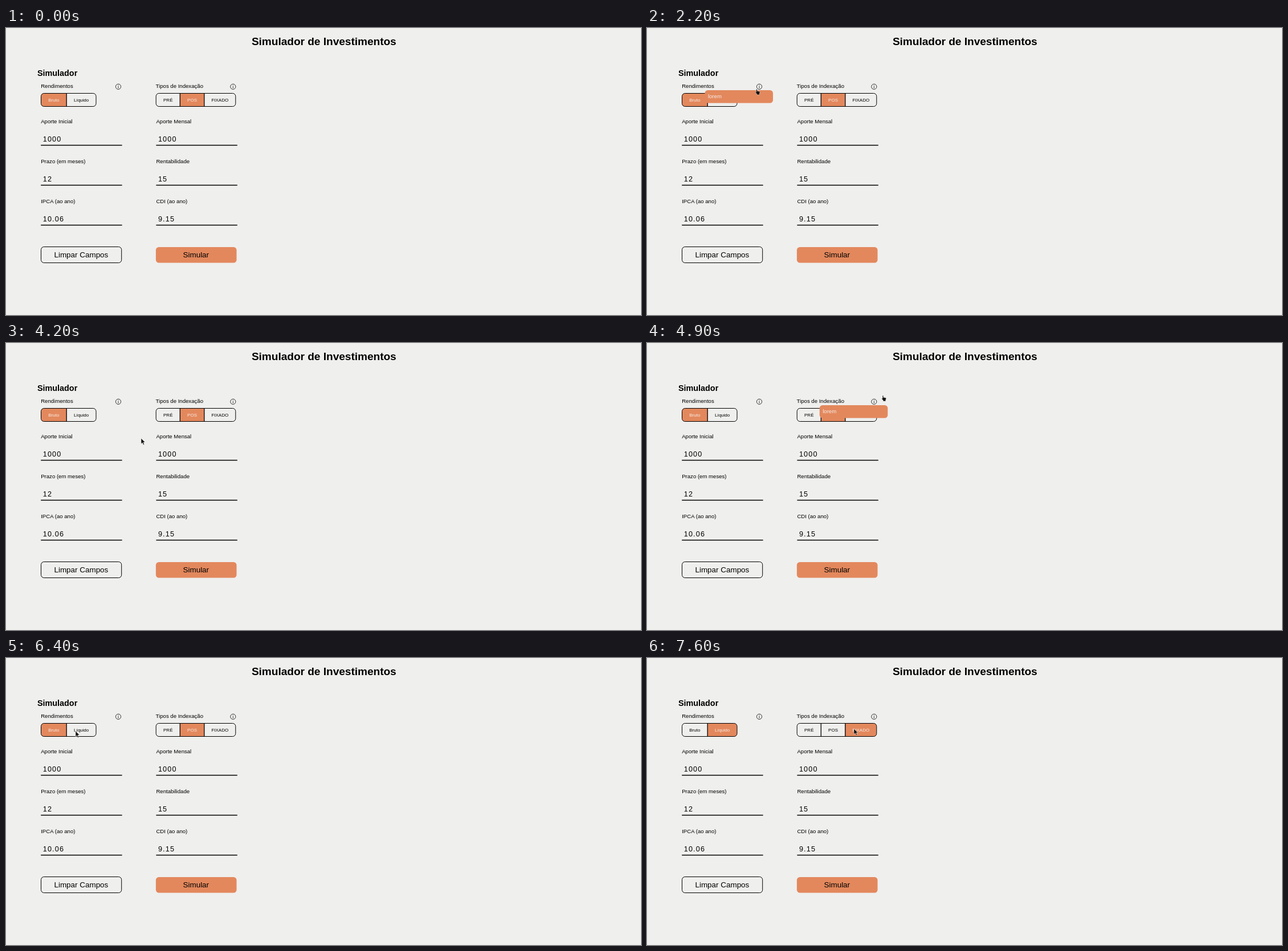
Animation, 1114 px wide and 503 px high, one loop 8000 ms. Source, as an HTML page:

```html
<!DOCTYPE html>
<html lang="pt">
<head>
<meta charset="utf-8">
<title>Simulador</title>
<style>
html, body { margin: 0; width: 100%; height: 100%; overflow: hidden; background: #efefed; }
svg { display: block; font-family: "Liberation Sans", Arial, sans-serif; }
.title { font-size: 19.05px; font-weight: 700; text-anchor: middle; }
.heading { font-size: 14.4px; font-weight: 700; }
.label { font-size: 9.6px; }
.value { font-size: 12.6px; letter-spacing: 1.2px; }
.option { font-size: 8px; text-anchor: middle; }
.button { font-size: 13.44px; text-anchor: middle; }
.on { fill: #e3885d; }
.off { fill: #efefed; }
.light { fill: #f8eee8; }
.line { fill: none; stroke: #000; }
</style>
</head>
<body>
<svg id="stage" width="1114" height="503" viewBox="0 0 1114 503"></svg>
<script>
const stage = document.getElementById("stage");
const columns = [61.2, 263.4];

const text = (x, y, s, cls) => `<text x="${x}" y="${y}" class="${cls}">${s}</text>`;
const box = (x, y, w, h, cls, r = 5.2) =>
  `<rect x="${x}" y="${y}" width="${w}" height="${h}" rx="${r}" class="${cls}"/>`;

const info = x => `<g transform="translate(${x} 102.8)" stroke="#333" fill="none">
  <circle r="4.6"/><path d="M0-.7V2.7M0-2.7v1.1"/></g>`;

const field = (x, y, [label, value]) =>
  text(x, y, label, "label") + text(x + 3.5, y + 32, value, "value") +
  `<path class="line" stroke-width="1.3" d="M${x} ${y + 38.5}h142.4"/>`;

// Segmented control: edges are the x positions of its borders.
function toggle(id, edges, names) {
  const left = edges[0], width = edges.at(-1) - left;
  const cells = names.map((name, i) => `<g>` +
    box(edges[i], 114.5, edges[i + 1] - edges[i], 23, "off", 0) +
    text((edges[i] + edges[i + 1]) / 2, 128.7, name, "option") + "</g>").join("");
  const bars = edges.slice(1, -1).map(x => `M${x} 114.5v23`).join("");
  return `<clipPath id="${id}clip">${box(left, 114.5, width, 23, "")}</clipPath>
    <g id="${id}" clip-path="url(#${id}clip)">${cells}</g>` +
    box(left, 114.5, width, 23, "line") +
    `<path class="line" stroke-width="1.3" d="${bars}"/>`;
}

const tip = (id, x) => `<g id="${id}">` + box(x, 109, 119.5, 22.5, "on") +
  text(x + 5.4, 123, "lorem", "label light") + "</g>";

const rows = [
  [["Aporte Inicial", "1000"], ["Aporte Mensal", "1000"]],
  [["Prazo (em meses)", "12"], ["Rentabilidade", "15"]],
  [["IPCA (ao ano)", "10.06"], ["CDI (ao ano)", "9.15"]]
];

stage.innerHTML =
  text(557.8, 30.4, "Simulador de Investimentos", "title") +
  text(54.9, 84.2, "Simulador", "heading") +
  text(61.2, 105.2, "Rendimentos", "label") + info(197) +
  text(262.6, 105.2, "Tipos de Indexação", "label") + info(398.3) +
  toggle("income", [61.5, 106.2, 158], ["Bruto", "Líquido"]) +
  toggle("index", [263.2, 305.3, 347.8, 402.8], ["PRÉ", "POS", "FIXADO"]) +
  rows.map((row, r) => row.map((cell, c) => field(columns[c], 167 + 70 * r, cell)).join("")).join("") +
  box(61.5, 383.5, 141.2, 28, "line") + text(131.9, 402, "Limpar Campos", "button") +
  box(262.9, 384, 141.6, 27.5, "on") + text(333.3, 402, "Simular", "button") +
  tip("tip1", 101.5) + tip("tip2", 302.8) +
  `<path id="arrow" d="M0 0V9.8L2.3 7.7 4 11.4 5.6 10.7 4 7.1H7Z" fill="#111" stroke="#fff" stroke-width=".5"/>
  <path id="hand" d="M1.6.6Q2.5-.2 3.3.7V3.4L7.2 4.2Q8.2 4.6 8 5.8L7.2 8.2V10H2.8V8.6L.2 5.8Q.2 4.6 1.7 5.3Z"
    fill="#111" stroke="#fff" stroke-width=".4"/>`;

// Pointer moves, each an eased curve from where the last one ended; "bend" is its control point.
const home = [80, 15];
const moves = [
  { from: 1300, until: 1900, to: [188, 107], bend: [234, 157] },
  { from: 2100, until: 2300, to: [192, 107] },
  { from: 3100, until: 3200, to: [193, 110] },
  { from: 3200, until: 3400, to: [224, 183] },
  { from: 4100, until: 4200, to: [237, 167] },
  { from: 4200, until: 5000, to: [394, 100], bend: [610, 0] },
  { from: 5000, until: 5200, to: [401, 102] },
  { from: 5400, until: 5500, to: [405, 106] },
  { from: 5500, until: 5600, to: [408, 188] },
  { from: 5700, until: 6400, to: [122, 128], bend: [-30, 120] },
  { from: 6900, until: 7400, to: [363, 124] }
];

const ease = k => k * k * (3 - 2 * k);

function pointerAt(t) {
  let at = home;
  for (const { from, until, to, bend } of moves) {
    if (t <= from) break;
    const u = ease(Math.min(1, (t - from) / (until - from)));
    at = at.map((a, i) => {
      const mid = bend ? bend[i] : (a + to[i]) / 2;
      return a * (1 - u) ** 2 + 2 * mid * u * (1 - u) + to[i] * u * u;
    });
  }
  return at;
}

const $ = id => document.getElementById(id);
const within = (t, from, until) => t >= from && t < until;
const show = (id, on) => $(id).setAttribute("visibility", on ? "visible" : "hidden");

function select(id, chosen) {
  [...$(id).children].forEach((cell, i) => {
    cell.children[0].setAttribute("class", i === chosen ? "on" : "off");
    cell.children[1].setAttribute("class", i === chosen ? "option light" : "option");
  });
}

function draw(now) {
  // The screen refreshes ten times a second.
  const t = Math.floor(now % 8000 / 100) * 100;
  const hand = within(t, 1800, 3300) || within(t, 4900, 5500);
  show("tip1", within(t, 1800, 3300));
  show("tip2", within(t, 4900, 5600));
  show("hand", hand);
  show("arrow", t >= 1300 && !hand);
  select("income", t < 6600 ? 0 : 1);
  select("index", t < 7600 ? 1 : 2);
  for (const id of ["arrow", "hand"]) $(id).setAttribute("transform", `translate(${pointerAt(t)})`);
  requestAnimationFrame(draw);
}
requestAnimationFrame(draw);
</script>
</body>
</html>
```
